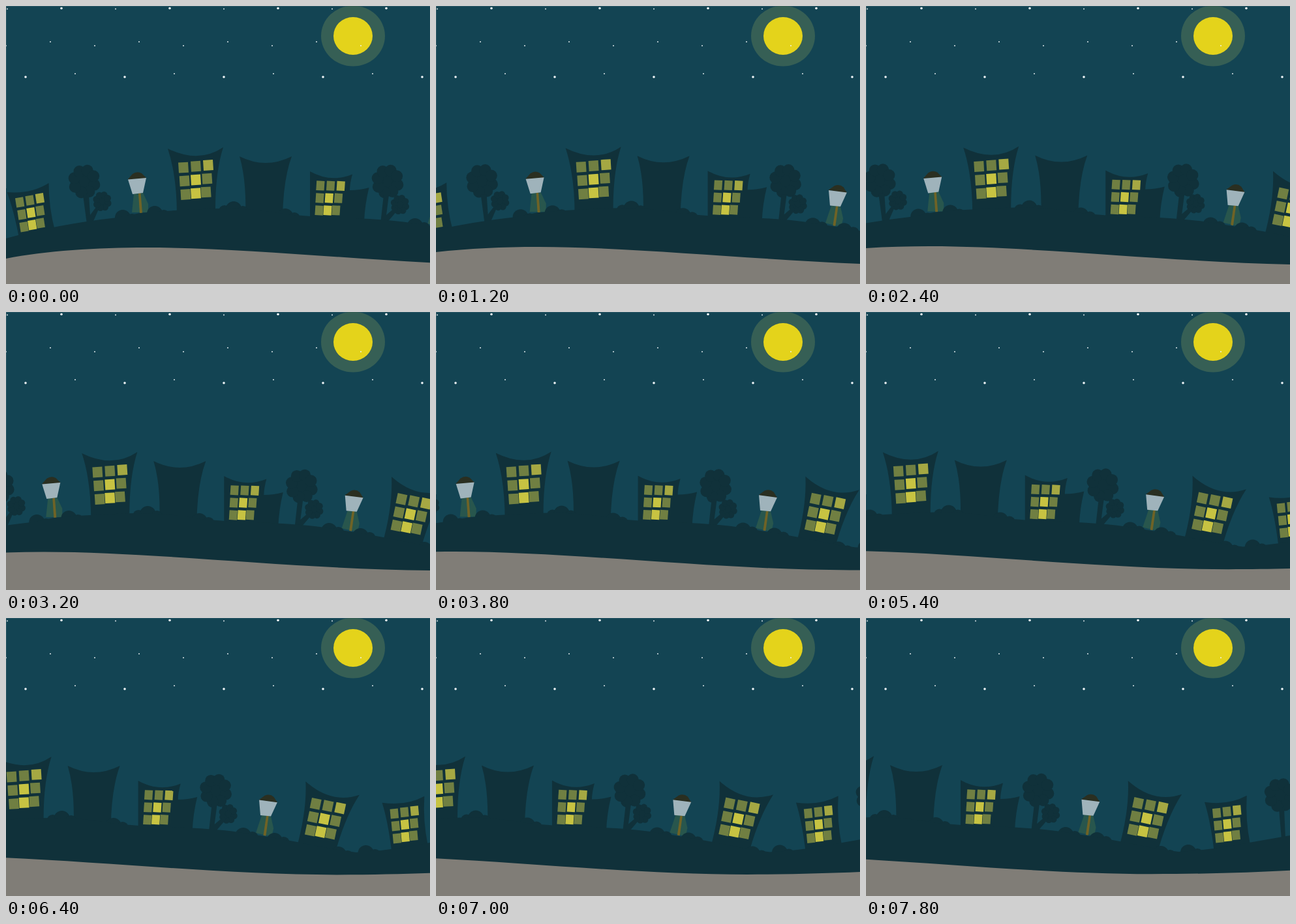
Recreate the animation shown at these times as an HTML page. Size 650 px wide and 427 px high, loop 8 s.

```html
<!DOCTYPE html>
<html lang="en">
<head>
<meta charset="utf-8">
<title>Night town</title>
<style>
html, body { margin: 0; width: 100%; height: 100%; overflow: hidden; background: #134453; }
svg { display: block; width: 100%; height: 100%; }
</style>
</head>
<body>
<svg viewBox="0 0 650 427" preserveAspectRatio="none">
  <defs>
    <g id="windows"></g>
    <g id="crown"><circle r="20"/></g>
    <g id="bush">
      <circle r="12"/>
      <circle cx="14" cy="3" r="9"/>
    </g>
    <g id="tower">
      <path d="M-42 -47.5Q5 -24 43 -49.5Q30 -9 31 55H-28Q-28 -5 -42 -47.5Z"/>
      <use href="#windows"/>
    </g>
    <g id="house">
      <path d="M-36 -31Q1 -28 28 -45Q28 -7 38 30L-17 42Q-25 -2 -36 -31Z"/>
      <use href="#windows" transform="rotate(-5.5) scale(.82 .92)"/>
    </g>
    <g id="lamp">
      <path fill="#28564d" d="M-5 11L9 10L17 27V40H-8Z"/>
      <path fill="#6f6326" d="M2 11L5.500 10L8 41H4Z"/>
      <path fill="#2a2f21" d="M-14.500 -10.500L-7 -19Q0 -24 7 -20L14.500 -12.500Z"/>
      <path fill="#9fb3bb" d="M-14 -10.500L14 -13L9 10L-7 12Z"/>
    </g>
  </defs>

  <rect width="650" height="427" fill="#134453"/>
  <path d="M0 .5H650M.5 0V280" stroke="#fff" stroke-opacity=".1"/>
  <ellipse cx="532" cy="46" rx="49" ry="46.500" fill="#365f55"/>
  <ellipse cx="532" cy="46" rx="30" ry="29" fill="#e4d31b"/>
  <g id="stars" fill="#f2f8fa"></g>

  <g id="town" fill="#10313a">
    <use href="#house" x="37.500" y="317"/>
    <use href="#tower" x="290" y="266.500"/>
    <path d="M358 231Q398 251 438 231Q425 266 424 325H367Q369 268 358 231Z"/>
    <path d="M466 254Q498 272 531 258.500Q527 273 527 283Q542 283 556.500 279Q550 305 549 332H466Z"/>
    <use href="#windows" transform="translate(494.500 294.500) rotate(7) scale(.82 .92)"/>
    <use href="#tower" transform="translate(750.500 312) rotate(15.500)"/>
    <use href="#house" transform="translate(874 321) rotate(3.500)"/>

    <use href="#crown" x="120" y="269.500"/>
    <use href="#crown" transform="translate(147.500 300) scale(.58)"/>
    <path d="M118 290H127L129 321L138 309L142 312L132 335H124Z"/>
    <use href="#crown" x="585" y="269.500"/>
    <use href="#crown" transform="translate(604 305) scale(.58)"/>
    <path d="M579 290H587L583 321L597 309L600 314L582 335H574Z"/>
    <use href="#crown" x="956" y="277"/>
    <path d="M954 298H962L964 345H958Z"/>

    <use href="#lamp" x="201" y="277"/>
    <use href="#lamp" transform="translate(662.800 297) rotate(12.500)"/>

    <use href="#bush" x="179" y="325"/>
    <use href="#bush" x="228" y="319"/>
    <use href="#bush" transform="translate(349 312) scale(-1 1)"/>
    <use href="#bush" x="349" y="313"/>
    <use href="#bush" x="428" y="323"/>
    <use href="#bush" x="627" y="338"/>
    <use href="#bush" x="675" y="346"/>
    <use href="#bush" x="773" y="367"/>
    <use href="#bush" x="815" y="365"/>
    <path d="M0 357Q80 335 170 325L205 318Q250 314 300 312Q370 308 430 320L480 324Q570 326 620 333Q700 345 770 360L800 364Q840 362 880 355L1000 334V440H0Z"/>
  </g>
  <path id="road" fill="#807d77" d="M0 388C60 376 140 371 215 371C390 371 620 399.500 820 399.500C910 399.500 980 396.500 1040 393.500V450H0Z"/>
</svg>
<script>
const byId = id => document.getElementById(id);
const circle = (x, y, r) => `<circle cx="${x}" cy="${y}" r="${r}"/>`;
const repeat = (count, draw) => Array.from({ length: count }, (_, i) => draw(i)).join('');

// A 3 x 3 grid that narrows towards the bottom and climbs to the right.
byId('windows').innerHTML = repeat(9, i => {
  const col = i % 3 - 1, row = Math.floor(i / 3) - 1;
  const x = 1 + col * (17.3 - 1.7 * row);
  const y = 0.5 + 20.7 * row - 1.8 * col;
  const lit = col === 0 && row >= 0;
  const color = lit ? '#c7c342' : i === 2 ? '#a5a843' : '#707f42';
  return `<rect x="-7.5" y="-8" width="15" height="16" fill="${color}"
    transform="translate(${x} ${y}) rotate(-3.5)"/>`;
});

byId('crown').innerHTML += repeat(8, i => {
  const angle = i * Math.PI / 4 + 0.3;
  return circle(16 * Math.cos(angle), 17.5 * Math.sin(angle), 9);
});

// Three rows of evenly spaced stars; the outer rows alternate large and small.
const starRow = (start, gap, y, wave, firstBig) => repeat(9, i => {
  const big = i % 2 === firstBig;
  return circle(start + gap * i, y + wave * Math.cos(i * Math.PI), big ? 1.8 : 0.9);
});
byId('stars').innerHTML =
  starRow(2, 83, 4, 0.5, 1) +
  starRow(0, 68, 58, 3, -1) +
  starRow(30, 76, 106.5, 2.5, 0);

const LOOP = 8000, STEP = 200;

function shift(id, dx, dy, step) {
  byId(id).setAttribute('transform', `translate(${dx * step} ${dy * step})`);
}

// The ground scrolls in discrete steps, the nearer road a little faster.
function draw() {
  const step = Math.floor(performance.now() % LOOP / STEP);
  shift('town', -8.23, -0.128, step);
  shift('road', -9.8, -0.16, step);
  requestAnimationFrame(draw);
}
draw();
</script>
</body>
</html>
```
